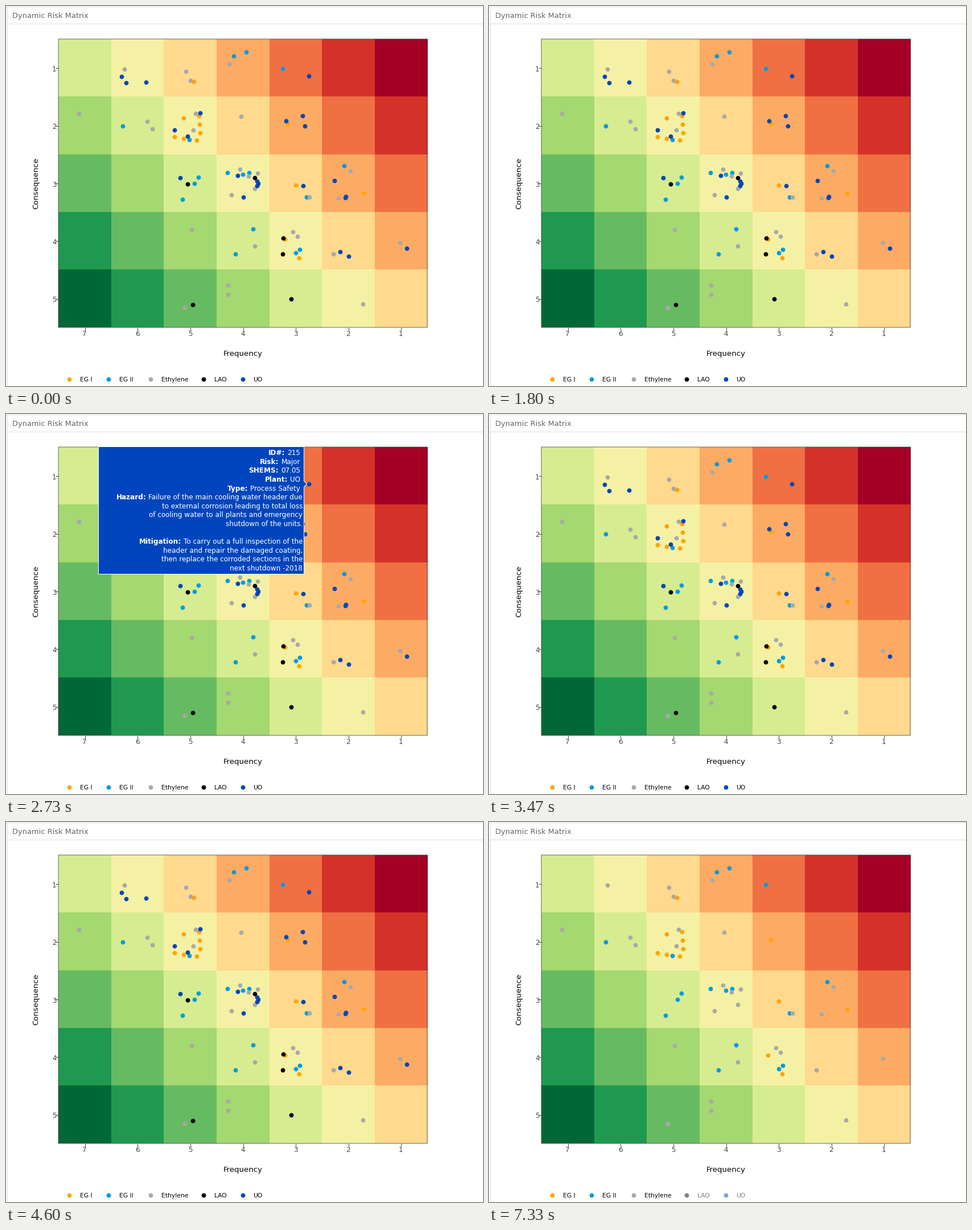
Animation of 838x668 px, one loop 8000 ms. Source, as a matplotlib script:

```python
import matplotlib.pyplot as plt
from matplotlib.animation import FuncAnimation
from matplotlib.patches import Polygon, Rectangle
import numpy as np

W, H, DPI = 838, 668, 100
LOOP, STEP = 8000, 20
LEFT, RIGHT, TOP, BOTTOM = 92, 740, 58, 565
COL_W, ROW_H = (RIGHT - LEFT) / 7, (BOTTOM - TOP) / 5
PX = 72 / DPI
LINE_H = 15.6
INK = "#444444"

RAMP = ["#006837", "#1f9950", "#66bb62", "#a4d870", "#d6ec91", "#f5f1a4",
        "#ffd98e", "#fdab64", "#f07044", "#d43229", "#a50026"]

# name: colour, legend x, number of dots in each cell (row by row)
SERIES = {
    "EG I": ("#ffa500", 111, "0010000 0070100 0000110 0000200 0000000"),
    "EG II": ("#009cde", 180, "0002100 0110000 0033110 0002200 0000000"),
    "Ethylene": ("#a9a9a9", 254, "0121000 1221000 0005120 0011211 0012010"),
    "LAO": ("#000000", 347, "0000000 0000000 0011000 0000200 0010100"),
    "UO": ("#0045bd", 416, "0300100 0030300 0015130 0000021 0000000"),
}

# start, end, dot, far edge, plant, (id, risk, code, type), hazard, mitigation
TIPS = [
    (530, 1200, (310, 340), 673, "EG II",
     ("147", "Minor", "07.02", "Injury/Illness"),
     "Exposure to hot steam when draining the line|due to passing valve.",
     "To install a second isolation valve in|the next shutdown"),
    (1330, 1800, (338, 301), 693, "EG II",
     ("153", "Minor", "07.05", "Injury/Illness"),
     "Slip and fall from the ladder of the cooling|tower during inspection.",
     "To replace the ladder with stairs -2018"),
    (1870, 2400, (335, 236), 721, "EG I",
     ("188", "Medium", "07.05", "Process Safety"),
     "Loss of containment from the pump seal leading|"
     "to release of hot glycol to the surrounding|area and possible fire.",
     "To upgrade the pump seal to a double|"
     "seal with monitoring system and to revise|the inspection plan"),
    (2400, 2470, (341, 223), 721, "EG I",
     ("190", "Medium", "07.03", "Process Safety"),
     "High pressure in the reactor feed line leading|"
     "to opening of the relief valve and release|of vapor to atmosphere.",
     "To connect the relief valve outlet to the|"
     "flare header and to add a pressure alarm|in the control room"),
    (2670, 2730, (486, 110), 162, "EG II",
     ("161", "Major", "07.05", "Process Safety"),
     "Leak from the flange of the reactor|due to thermal cycling.",
     "To replace the gasket -2017"),
    (2730, 3470, (532, 123), 162, "UO",
     ("215", "Major", "07.05", "Process Safety"),
     "Failure of the main cooling water header due|"
     "to external corrosion leading to total loss|"
     "of cooling water to all plants and emergency|shutdown of the units.",
     "To carry out a full inspection of the|"
     "header and repair the damaged coating,|"
     "then replace the corroded sections in the|next shutdown -2018"),
    (3930, 4400, (528, 336), 126, "EG II",
     ("158", "Medium", "07.05", "Injury/Illness"),
     "Exposure to chemical vapor during sample collection|due to open sample point.",
     "To provide a closed loop sampling system for|the unit in shutdown -2018"),
    (4400, 4470, (490, 410), 114, "EG I",
     ("192", "Minor", "07.05", "Injury/Illness"),
     "Exposure to hot glycol leading to burn hazard due|to leak.",
     "To replace the line in EG1 shutdown -2017"),
    (4470, 4530, (487, 408), 112, "LAO",
     ("204", "Minor", "07.05", "Injury/Illness"),
     "Exposure to hot surface near the reactor outlet|during operator rounds.",
     "To install insulation on the line and|add warning signs"),
    (4530, 4600, (486, 436), 27, "LAO",
     ("206", "Minor", "07.03", "Process Safety"),
     "Plugging of the reactor outlet line due to polymer build|"
     "up leading to high pressure in the reactor and opening of|"
     "the relief valve. The cleaning of the line needs opening|"
     "of the system and may expose the operators to solvent and|hot product.",
     "To review the washing procedure and increase the|"
     "frequency of the hot wash, install a pressure gauge|"
     "upstream of the outlet valve, provide a flushing point|"
     "and train all operators on the new procedure before|the next shutdown"),
]
HIDE = {"UO": 6470, "LAO": 7330}

plt.rcParams["font.family"] = "DejaVu Sans"
fig = plt.figure(figsize=(W / DPI, H / DPI), dpi=DPI, facecolor="white")
ax = fig.add_axes([0, 0, 1, 1])
rng = np.random.default_rng(7)


def label(x, y, text, size=12, color=INK, **kw):
    return ax.text(x, y, text, fontsize=size * PX, color=color,
                   va="baseline", **kw)


def line(xs, ys, color=INK):
    ax.plot(xs, ys, color=color, lw=PX, solid_capstyle="butt")


def cell_center(col, row):
    return LEFT + (col + 0.5) * COL_W, TOP + (row + 0.5) * ROW_H


def draw_panel():
    line([0, W], [0.5, 0.5], "#dddddd")
    line([1.5, 1.5], [0, H], "#dddddd")
    line([1.5, W], [30.5, 30.5], "#dddddd")
    label(11, 21, "Dynamic Risk Matrix", 13, "#666666")


def draw_matrix():
    # The colour of a cell depends only on its diagonal
    rgb = np.array([[int(c[k:k + 2], 16) for k in (1, 3, 5)] for c in RAMP])
    diagonal = np.arange(7)[None, :] - np.arange(5)[:, None] + 4
    ax.imshow(rgb[diagonal].astype(np.uint8), extent=(LEFT, RIGHT, BOTTOM, TOP),
              interpolation="nearest", aspect="auto", zorder=0)
    ax.add_patch(Rectangle((LEFT, TOP), RIGHT - LEFT, BOTTOM - TOP, fill=False,
                           ec=INK, alpha=0.8, lw=PX, snap=False))
    for i in range(7):
        x, _ = cell_center(i, 0)
        line([np.floor(x) + 0.5] * 2, [565, 570])
        label(x, 580, str(7 - i), ha="center")
    for i in range(5):
        _, y = cell_center(0, i)
        line([87, 92], [np.floor(y) + 0.5] * 2)
        label(88.5, y + 6, str(i + 1), ha="right")
    label(416, 614.5, "Frequency", 13.3, "black", ha="center")
    label(56.5, 311.5, "Consequence", 13.3, "black", ha="center",
          rotation=90, rotation_mode="anchor")


def place_dots(name, grid):
    """Hovered dots stay put; the others are jittered around their cell center."""
    pinned = [tip[2] for tip in TIPS if tip[4] == name]
    points = list(pinned)
    for row, counts in enumerate(grid.split()):
        for col, count in enumerate(counts):
            center = np.array(cell_center(col, row))
            taken = sum(abs(x - center[0]) < COL_W / 2 and abs(y - center[1]) < ROW_H / 2
                        for x, y in pinned)
            for _ in range(int(count) - taken):
                points.append(center + rng.uniform(-0.3, 0.3, 2) * (COL_W, ROW_H))
    return points


def scatter(points, color, z):
    x, y = np.transpose(points)
    return ax.scatter(x, y, s=(7.8 * PX) ** 2, c=color, linewidths=0, zorder=z)


def tooltip(point, edge, plant, head, hazard, mitigation):
    """Hover box between a dot and the far edge; returns its artists."""
    x, y = point
    side = 1 if edge > x else -1
    ink = INK if plant == "EG I" else "white"
    rows = list(zip(("ID#:", "Risk:", "SHEMS:", "Plant:", "Type:"),
                    (*head[:3], plant, head[3])))
    for key, text in (("Hazard:", hazard), ("", ""), ("Mitigation:", mitigation)):
        first, *rest = text.split("|")
        rows += [(key, first)] + [("", s) for s in rest]

    height = round(len(rows) * LINE_H + 5.6)
    top = max(TOP - 0.5, round(y - height / 2) + 0.5)
    bottom = top + height
    near, far = x + 8.5 * side, edge + 0.5
    parts = [ax.add_patch(Polygon(
        [(x + 3.5 * side, y), (near, y + 5), (near, bottom), (far, bottom),
         (far, top), (near, top), (near, y - 5)],
        fc=SERIES[plant][0], ec=ink, lw=PX, zorder=8))]
    for i, (key, value) in enumerate(rows):
        words = [(key, "bold"), (value, "normal")][::side]
        # The short rows end with a space
        pos = near + 3 if side > 0 else near - (6.5 if i < 5 else 2.5)
        for text, weight in words:
            if text:
                t = label(pos, top + 14.7 + i * LINE_H, text, 12, ink, weight=weight,
                          ha="left" if side > 0 else "right", zorder=9)
                ext = t.get_window_extent()
                pos = ext.x1 + 4 if side > 0 else ext.x0 - 4
                parts.append(t)
    return parts


ax.axis("off")
draw_panel()
draw_matrix()
ax.set_xlim(0, W)
ax.set_ylim(H, 0)

dots, keys = {}, {}
for z, (name, (color, x, grid)) in enumerate(SERIES.items()):
    dots[name] = scatter(place_dots(name, grid), color, 3 + z * 0.1)
    keys[name] = (scatter([(x, 656)], color, 3),
                  label(x + 18.5, 660, name, 10.8, "black"))
boxes = [(start, end, tooltip(*rest)) for start, end, *rest in TIPS]


def draw(i):
    t = (i + 0.5) * STEP
    for start, end, parts in boxes:
        for p in parts:
            p.set_visible(start <= t < end)
    for name, when in HIDE.items():
        dots[name].set_visible(t < when)
        for k in keys[name]:
            k.set_alpha(1 if t < when else 0.5)
    return []


anim = FuncAnimation(fig, draw, frames=LOOP // STEP, interval=STEP,
                     init_func=lambda: draw(0), repeat=True, repeat_delay=0,
                     blit=False)
plt.show()
```
